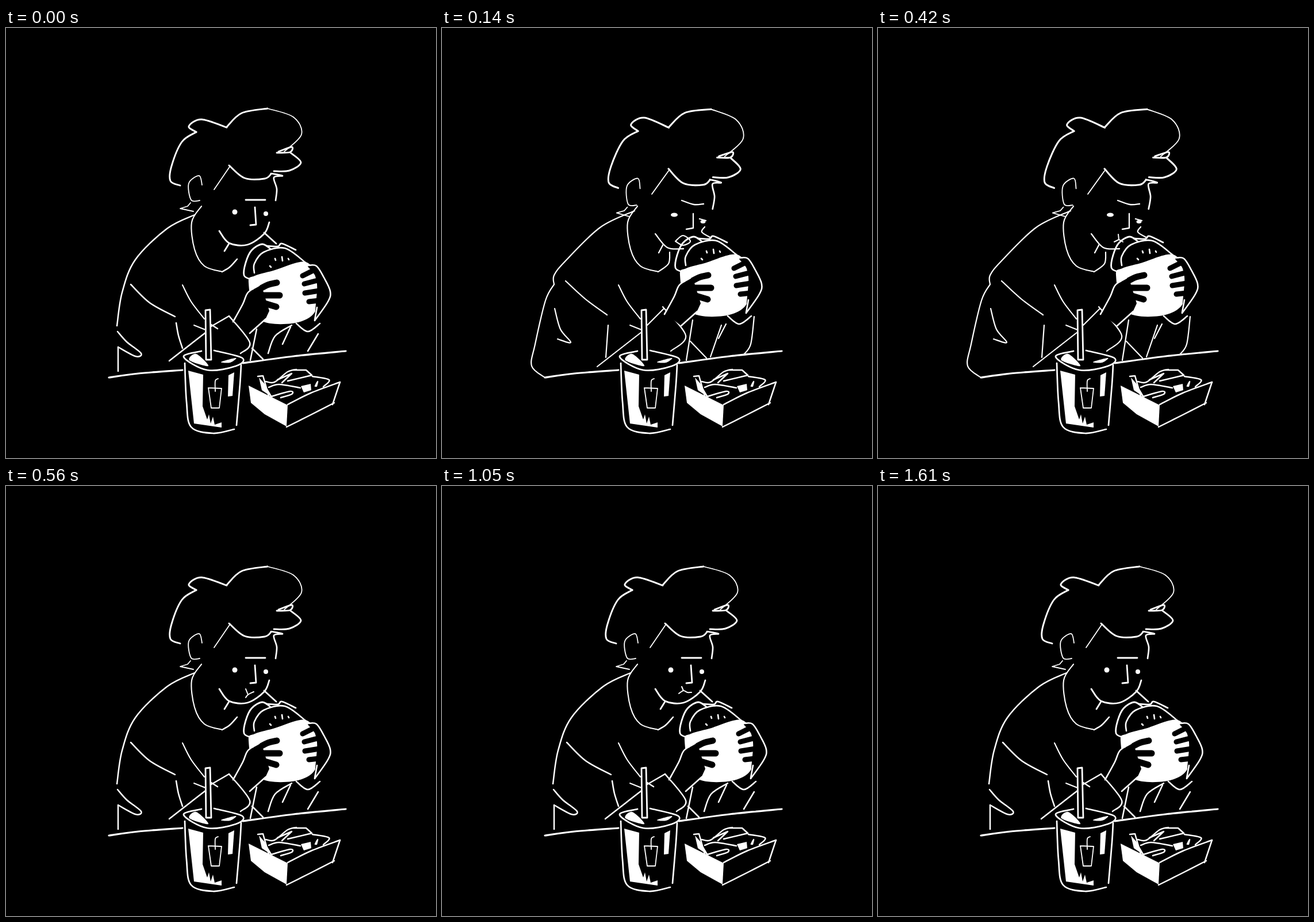
These frames come from a looping animation (748x748 px, 2380 ms). An HTML page:

```html
<!DOCTYPE html>
<html lang="en">
<head>
<meta charset="utf-8">
<title>Lunch break</title>
<style>
  html, body { margin: 0; width: 100%; height: 100%; overflow: hidden; background: #000; }
  svg { display: block; width: 100vw; height: 100vh; }
  path { fill: none; stroke: #fff; stroke-linecap: round; stroke-linejoin: round; }
</style>
</head>
<body>
<svg viewBox="0 0 748 748">
  <g id="body"></g>
  <g id="hair"></g>
  <g id="face"></g>
  <g id="burger"></g>
  <g id="still"></g>
</svg>
<script>
const STEP = 70, LOOP = 2380;
const layer = id => document.getElementById(id);

// Smooth curve through points; a leading "L" keeps the corners sharp.
function trace(text, closed) {
  const words = text.trim().split(/\s+/);
  const sharp = words[0] === 'L';
  const p = words.slice(sharp ? 1 : 0).map(s => s.split(',').map(Number));
  const n = p.length, end = closed ? 'Z' : '';
  if (sharp) return 'M' + p.join('L') + end;
  const at = i => closed ? p[(i + n) % n] : p[Math.max(0, Math.min(n - 1, i))];
  let d = 'M' + p[0];
  for (let i = 0; i < (closed ? n : n - 1); i++) {
    const [a, b, c, e] = [at(i - 1), at(i), at(i + 1), at(i + 2)];
    const u = b.map((v, k) => v + (c[k] - a[k]) / 6);
    const w = c.map((v, k) => v - (e[k] - b[k]) / 6);
    d += `C${u} ${w} ${c}`;
  }
  return d + end;
}

const ink = (width, text, color = '#fff') => text.split('/').map(line =>
  `<path d="${trace(line)}" style="stroke:${color};stroke-width:${width}"/>`).join('');
const fill = (color, text) => text.split('/').map(line =>
  `<path d="${trace(line, true)}" style="fill:${color};stroke:none"/>`).join('');
const dot = (x, y, r, q = r) => `<ellipse cx="${x}" cy="${y}" rx="${r}" ry="${q}" fill="#fff"/>`;

const curls = ink(2.9, `303,274 286,266 288,240 306,198 331,181
  / 331,181 318,171 340,159 384,173
  / 384,172 410,148 455,140
  / 474,215 497,207 494,216 471,217
  / 495,217 513,234 493,248 466,249
  / 388,239 415,261 450,262 461,254`);
const wisps = ink(1.8, `455,140 500,155 514,185 484,215
  / 390,240 362,281
  / 341,273 336,257 318,270 322,299 337,300
  / L 321,304 316,310 303,314 326,319`);
const temple = ink(2.7, '461,253 481,257 466,260 471,280 469,300');
layer('hair').innerHTML = curls + wisps + temple;

const shirt = ink(2.1, `340,310 323,338 328,385 345,414 376,424
  / 307,447 322,476 345,506
  / 327,517 347,525`);

const restFace = ink(2.8, `371,353 388,374 420,377 449,358 458,338
  / 388,375 380,388 / 417,299 451,299
  / L 433,312 435,342 425,343
  / 449,356 470,375`) + dot(398, 320, 4.5) + dot(452, 323, 4);
const restBody = ink(2.5, `376,424 389,416 402,402
  / 328,325 280,349 225,403 202,460 193,518
  / 194,528 210,546 235,566 225,571 195,555 / 195,555 195,597
  / 217,446 250,478 294,502
  / 296,513 300,535 307,557
  / 284,579 320,551 347,530
  / 357,519 388,501 / 357,516 368,523
  / 388,501 424,547 408,566
  / 436,524 425,578 / 428,557 447,576
  / 456,566 468,536 497,517
  / 481,550 495,520 / 543,532 525,562`);

const leanFace = ink(2.3, `371,358 392,382 420,384
  / 385,376 377,391
  / 417,300 438,307 455,306
  / L 437,323 437,348 425,350
  / 457,346 452,355 468,365 / 448,332 459,335`)
  + dot(404, 325, 6, 3.6) + dot(454, 337, 4.5, 3);
const leanBody = ink(2.2, `376,424 394,410 396,390
  / 335,318 275,347 215,405 195,430 195,446
  / 195,446 180,474 162,550 156,588 179,608
  / 196,488 206,524 224,547 201,541
  / 215,440 250,472 287,499
  / 289,517 285,573 / 270,589 347,529
  / 357,517 385,489 / 384,485 424,535 398,562
  / 436,508 425,578 / 432,545 460,574
  / 467,572 486,517 / 481,540 494,515
  / 543,502 537,550 525,568`);

const biteFace = ink(2.7, `370,352 382,371 398,376
  / 388,376 380,390
  / 427,307 445,317 466,319
  / 455,337 465,338 / 445,322 437,355
  / 412,360 403,363 404,374
  / 414,367 425,358 437,357`) + ink(4, '405,322 418,328');
const biteBody = ink(2.5, `376,424 391,410 394,380
  / 343,311 280,337 220,390 185,425
  / 187,430 173,453 178,462
  / 180,461 158,525 144,585 / 144,585 185,607
  / 193,466 221,515 200,522
  / 208,424 260,474 294,497
  / 278,512 281,566 / 268,579 344,508
  / 357,498 378,466 / 376,464 395,497 420,497
  / 428,487 393,553 / 434,533 425,578
  / 432,543 467,566 / 467,565 468,545 495,505
  / 467,553 507,570 / 541,488 547,520 518,562`);

const bun = ink(2.8, `425,437 414,430 417,408 427,387 446,376 462,386
  / 453,379 473,380 480,375 504,386`)
  + fill('#000', '432,430 432,410 448,390 485,383 521,408')
  + ink(2.6, `432,426 432,410 448,390 485,383 521,408
  / 468,401 469,404 / 480,398 481,405 / 491,401 492,403 / 459,414 461,416`);
const wrap = fill('#fff', '422,443 433,431 465,422 521,407 540,440 538,493 497,514 438,505');
const hands = fill('#000', `L 421,458 445,450 458,492 452,505 424,531 397,510
  / 525,414 548,424 562,458 553,487 538,504 541,440`)
  + ink(11, '436,457 455,447 471,443 / 440,465 476,465 / 440,476 470,485', '#000')
  + ink(9, '516,431 540,419 / 519,445 542,439 / 520,461 545,457 / 527,476 545,474', '#000');
const wrists = ink(2.6, `395,511 412,480 421,460 440,448
  / 424,531 452,506
  / 525,413 540,414 553,434 564,458 560,476 537,509
  / 541,486 537,508
  / 505,514 525,528 546,514`);
layer('burger').innerHTML = bun + wrap + hands + wrists;

const table = ink(3.2, '179,608 230,601 307,595 / 412,583 500,571 591,562');

const cup = fill('#000', 'L 310,575 340,562 405,568 401,692 360,705 320,692')
  + ink(2.7, `311,583 314,650 322,694 360,705 397,698
  / 409,586 407,620 401,691
  / 340,562 309,572 350,595 400,588 411,574 362,561`)
  + fill('#fff', `331,567 319,578 352,588
  / 374,581 400,574 390,582
  / L 387,604 397,599 394,640 386,641
  / L 317,596 343,603 342,658 350,681 353,672 356,688 360,676 363,690 375,686 375,695 327,688`)
  + ink(1.8, `L 352,626 375,627 371,661 357,661 352,626
  / 364,632 364,614 369,610`);
const straw = fill('#000', 'L 347,491 355,490 357,577 348,577')
  + ink(2.8, 'L 348,577 347,491 355,490 357,577 348,577');

const fries = fill('#000', 'L 422,622 440,606 520,594 581,616 568,655 488,694')
  + fill('#fff', `L 422,622 490,656 488,693 450,672 426,652
  / L 440,608 449,618 464,643 445,630
  / L 513,623 530,619 531,630 518,634`)
  + ink(2.5, `490,655 530,635 581,616
  / L 581,616 568,655
  / 571,652 530,673 488,694
  / L 438,606 447,605 457,640
  / 452,615 467,616 490,598 505,594
  / L 472,612 497,601 480,617
  / L 500,595 522,595 532,604 490,614
  / 457,625 475,620 512,626
  / 458,642 494,632 497,637 478,643
  / 533,606 562,612 552,624
  / 538,623 542,615 540,623`);
layer('still').innerHTML = table + cup + straw + fries;

const gape = ink(2.2, '406,371 419,361 432,371 419,378 406,371');
const shut = ink(2, 'L 418,359 419,368 411,372 / 419,368 426,372');
const chew = {
  a: ink(2, '417,353 421,363 / 417,368 421,363 431,358'),
  b: ink(2, '417,352 420,359 / 416,365 420,360 432,359'),
  c: ink(2, '417,349 420,356 / 412,361 420,356 427,359 434,359'),
  d: ink(2, '422,357 431,357'),
  e: ink(2, '422,358 431,356')
};

const rest = { face: restFace, body: restBody, hold: [0, 0], turn: [1, 0, 0, 1, 0, 0] };
const lean = { face: leanFace, body: leanBody, hold: [-8, -13], turn: [1, .05, -.07, 1.08, 22.7, -32.7] };
const bite = { face: biteFace, body: biteBody, hold: [-14, -27], turn: [1, .14, -.135, 1, 53, -43.4] };
const lift = { ...rest, nod: [0, -6], hold: [-2, -3] };
const deep = { ...bite, nod: [2, 3], hold: [-14, -28] };

const poses = [rest, lift, lean, bite, deep, bite, lean, lift];
const mouths = ['', '', gape, '', '', '', shut, chew.b, ...[...'ababaabcbabcbde'].map(k => chew[k])];

let shown = -1;
function draw() {
  const step = Math.floor((performance.now() % LOOP) / STEP);
  if (step !== shown) {
    shown = step;
    const pose = poses[step] || rest;
    const nod = `translate(${pose.nod || [0, 0]})`;
    layer('body').innerHTML = shirt + pose.body;
    layer('hair').setAttribute('transform', `${nod} matrix(${pose.turn})`);
    layer('face').innerHTML = pose.face + (mouths[step] || '');
    layer('face').setAttribute('transform', nod);
    layer('burger').setAttribute('transform', `translate(${pose.hold})`);
  }
  requestAnimationFrame(draw);
}
draw();
</script>
</body>
</html>
```
